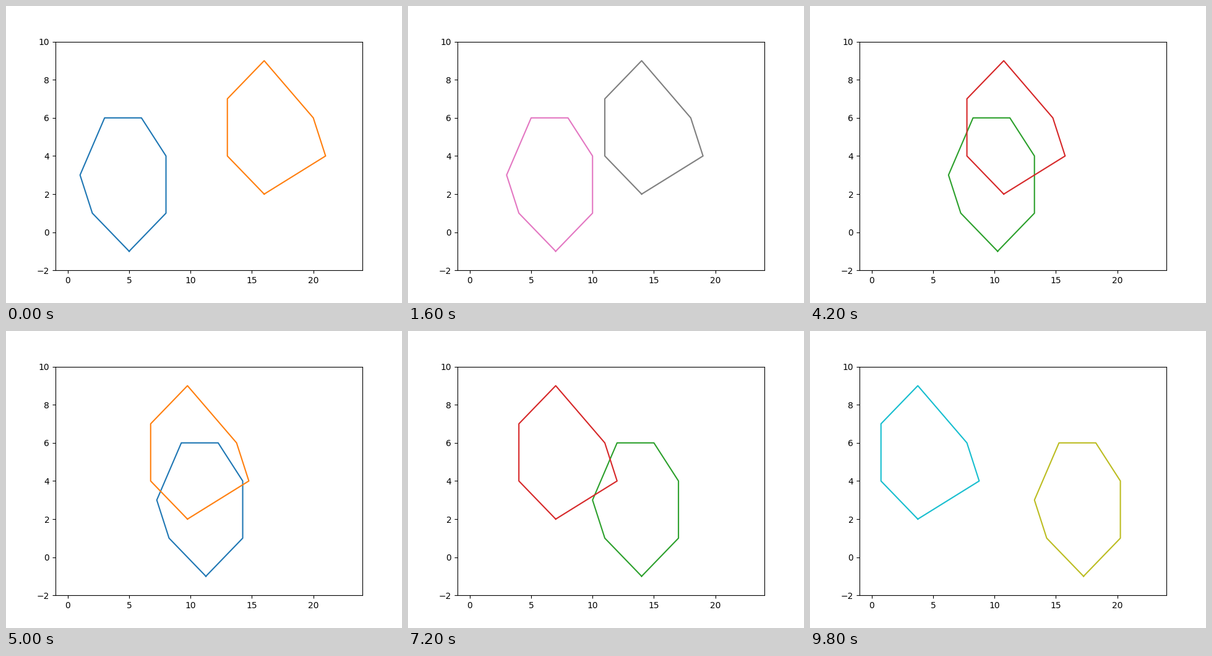
A matplotlib script that plays this animation: 640 px wide and 480 px high, repeating every 10 s.

```python
import numpy as np
import matplotlib.pyplot as plt
from matplotlib.animation import FuncAnimation

FRAMES = 50
INTERVAL = 200
STEP = 0.25  # shift per frame in data units


def closed(*corners):
    return np.array(corners + corners[:1]).T


# Corners run counterclockwise from the lowest point.
SHAPES = [
    closed((5, -1), (8, 1), (8, 4), (6, 6), (3, 6), (1, 3), (2, 1)),
    closed((16, 2), (21, 4), (20, 6), (16, 9), (13, 7), (13, 4)),
]
DIRECTIONS = [1, -1]

fig, ax = plt.subplots(figsize=(6.4, 4.8), dpi=100)
ax.set(xlim=(-1, 24), ylim=(-2, 10))
lines = [ax.plot([], [])[0] for _ in SHAPES]


def update(i):
    for k, (line, (x, y), way) in enumerate(zip(lines, SHAPES, DIRECTIONS)):
        line.set_data(x + way * STEP * i, y)
        # Each frame takes the next two colours of the default cycle.
        line.set_color(f"C{(len(lines) * i + k) % 10}")
    return lines


anim = FuncAnimation(fig, update, frames=FRAMES, interval=INTERVAL,
                     init_func=lambda: update(0), repeat=True, repeat_delay=0)
plt.show()
```
